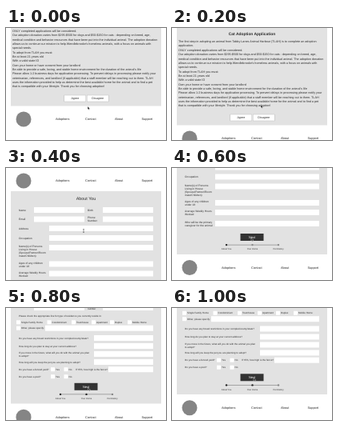
An HTML page with a canvas for the animation above (1200 ms loop, 200 by 140 pixels).

```html
<!DOCTYPE html>
<html lang="en">
<head>
<meta charset="utf-8">
<title>Adoption form</title>
<style>
html, body { margin: 0; width: 100%; height: 100%; overflow: hidden; background: #fff; }
canvas { display: block; width: 100vw; height: 100vh; }
</style>
</head>
<body>
<canvas></canvas>
<script>
const canvas = document.querySelector('canvas');
const ctx = canvas.getContext('2d');
const STEP = 200, INK = '#2c2c2c', PANEL = '#e2e2e2';

const intro = [
  'The first step in adopting an animal from Tabby Lanes Animal Harbour (TLAH) is to complete an adoption',
  'application.',
  'ONLY completed applications will be considered.',
  'Our adoption donation varies from $295-$500 for dogs and $50-$150 for cats - depending on breed, age,',
  'medical condition and behavior resources that have been put into the individual animal. The adoption donation',
  "allows us to continue our mission to help Wendlebrooke's homeless animals, with a focus on animals with",
  'special needs.',
  'To adopt from TLAH you must:',
  'Be at least 21 years old',
  'With a valid state ID',
  'Own your home or have consent from your landlord',
  "Be able to provide a safe, loving, and stable home environment for the duration of the animal's life",
  'Please allow 1-2 business days for application processing. To prevent delays in processing please notify your',
  'veterinarian, references, and landlord (if applicable) that a staff member will be reaching out to them. TLAH',
  'uses the information provided to help us determine the best available home for the animal and to find a pet',
  'that is compatible with your lifestyle. Thank you for choosing adoption!'
];

function rect(x, y, w, h, fill) {
  ctx.fillStyle = fill;
  ctx.fillRect(x, y, w, h);
}

function text(s, x, y, size = 3.3, align = 'left', color = INK, weight = '') {
  ctx.font = `${weight} ${size}px "Liberation Sans", Arial, sans-serif`;
  ctx.textAlign = align;
  ctx.fillStyle = color;
  ctx.fillText(s, x, y + size * 0.35);
}

// Several label lines, the first centred on y
function label(lines, x, y, size) {
  lines.split('|').forEach((s, i) => text(s, x, y + i * 4, size));
}

function field(x, y, right = 184, h = 7) {
  rect(x, y - h / 2, right - x, h, '#fff');
}

// Small blank in front of a choice
function choice(s, x, y) {
  field(x - 6, y, x - 1, 5);
  label(s, x, y, 3);
}

function nav(y) {
  ctx.fillStyle = '#858585';
  ctx.beginPath();
  ctx.arc(22, y, 9.5, 0, Math.PI * 2);
  ctx.fill();
  ['Adoptions', 'Contact', 'About', 'Support'].forEach((s, i) =>
    text(s, 70.7 + i * 35.2, y, 3.95, 'center'));
}

function button(s, x, y) {
  rect(x - 13.7, y - 4.2, 27.4, 8.4, '#b4b4b4');
  rect(x - 13.3, y - 3.8, 26.6, 7.6, '#fff');
  text(s, x, y, 3.7, 'center');
}

// Next button, progress line and the navigation under the panel
function footer(y, done) {
  rect(85.5, y - 4.5, 29, 9, '#333');
  text('Next', 100, y, 4, 'center', '#fff');
  rect(68, y + 9.3, 65, 0.6, '#777');
  ['About You', 'Your Home', 'Pet History'].forEach((s, i) => {
    const x = 68 + i * 32.5;
    ctx.fillStyle = i <= done ? '#222' : '#888';
    ctx.beginPath();
    ctx.arc(x, y + 9.6, 1.2, 0, Math.PI * 2);
    ctx.fill();
    text(s, x, y + 15, 2.7, 'center');
  });
  nav(y + 38);
}

function introPage() {
  rect(6, -4, 188, 125.5, PANEL);
  text('Cat Adoption Application', 100, 7, 4.9, 'center', INK, 'bold');
  intro.forEach((s, i) => text(s, 8, 16.8 + i * 5.35, 3.72));
  button('Agree', 86.3, 112);
  button('Disagree', 114.7, 112);
  nav(138);
}

function aboutPage() {
  nav(16);
  rect(6, 29, 188, 155.5, PANEL);
  text('About You', 100, 38, 5.4, 'center');
  label('Name', 16, 52.5);
  label('Birth', 102, 52.5);
  label('Email', 16, 64);
  label('Phone|Number', 102, 62);
  for (const y of [52.5, 64]) {
    field(35, y, 98);
    field(121, y);
  }
  const rows = [
    ['Address', 75.5, 75.5],
    ['Occupation', 87.5, 87.5],
    ['Name(s) of Persons|Living in House|(Spouse/Partner/Room|mate/Children)', 98, 99.5],
    ['Ages of any children|under 18', 118.5, 120],
    ['Average Weekly Hours|Worked', 130.5, 132],
    ['Who will be the primary|caregiver for the animal', 144.5, 146]
  ];
  for (const [s, y, box] of rows) {
    label(s, 16, y);
    field(54, box);
  }
  footer(163, 0);
}

function homePage() {
  rect(6, -40, 188, 159.5, PANEL);
  label('number', 102, 1, 3);
  field(35, 0, 98, 6);
  field(121, 0, 184, 6);
  label('Please check the appropriate line for type of residence you currently reside in:', 16, 9.5, 3);
  const kinds = [
    ['Single Family Home', 19], ['Condominium', 57.5], ['Townhouse', 88],
    ['Apartment', 113], ['Duplex', 136], ['Mobile Home', 158]
  ];
  for (const [s, x] of kinds) choice(s, x, 17.8);
  choice('Other, please specify:', 19, 25.2);
  field(49, 25.2);
  const rows = [
    ['Do you have any breed restrictions in your complex/county/state?', 37.5, 37.5],
    ['How long do you plan to stay at your current address?', 47.5, 47.5],
    ['If you move in the future, what will you do with the animal you plan|to adopt?', 56, 57.5],
    ['How long will you keep the pet you are planning to adopt?', 67.5, 67.5]
  ];
  for (const [s, y, box] of rows) {
    label(s, 16, y, 3);
    field(110, box);
  }
  ['Do you have a fenced yard?', 'Do you have a pool?'].forEach((s, i) => {
    const y = 76.7 + i * 9;
    label(s, 16, y, 3);
    choice('Yes', 62, y);
    choice('No', 78.5, y);
  });
  label('If YES, how high is the fence?', 87, 76.7, 3);
  field(128, 76.7);
  footer(98.3, 1);
}

function arrow(x, y) {
  ctx.beginPath();
  for (const [dx, dy] of [[0, 0], [0, 4], [1, 3.1], [1.8, 4.5], [2.4, 4.1], [1.8, 2.8], [3, 2.8]])
    ctx.lineTo(x + dx, y + dy);
  ctx.closePath();
  ctx.fillStyle = '#222';
  ctx.fill();
  ctx.strokeStyle = '#fff';
  ctx.lineWidth = 0.35;
  ctx.stroke();
}

function beam(x, y) {
  rect(x - 0.25, y - 2.2, 0.5, 4.4, '#333');
  rect(x - 0.9, y - 2.4, 1.8, 0.4, '#333');
  rect(x - 0.9, y + 2, 1.8, 0.4, '#333');
}

// page, scroll offset, pointer shape and its place
const views = [
  [introPage, 24, arrow, 102, 98],
  [introPage, 0, arrow, 111, 96],
  [aboutPage, 0, beam, 97, 78.5],
  [aboutPage, 76.5, arrow, 99, 87.5],
  [homePage, 0, arrow, 102.5, 99.5],
  [homePage, 11.5, arrow, 102, 87.5]
];

function draw(now) {
  const ratio = devicePixelRatio || 1;
  const w = Math.round(innerWidth * ratio), h = Math.round(innerHeight * ratio);
  if (canvas.width !== w || canvas.height !== h) {
    canvas.width = w;
    canvas.height = h;
  }
  const [page, scroll, pointer, x, y] = views[Math.floor(Math.max(0, now) / STEP) % views.length];
  ctx.setTransform(w / 200, 0, 0, h / 140, 0, 0);
  ctx.textRendering = 'geometricPrecision';
  rect(0, 0, 200, 140, '#fff');
  ctx.save();
  ctx.translate(0, -scroll);
  page();
  ctx.restore();
  pointer(x, y);
}

const start = performance.now();
function tick() {
  draw(performance.now() - start);
  requestAnimationFrame(tick);
}
tick();
</script>
</body>
</html>
```
